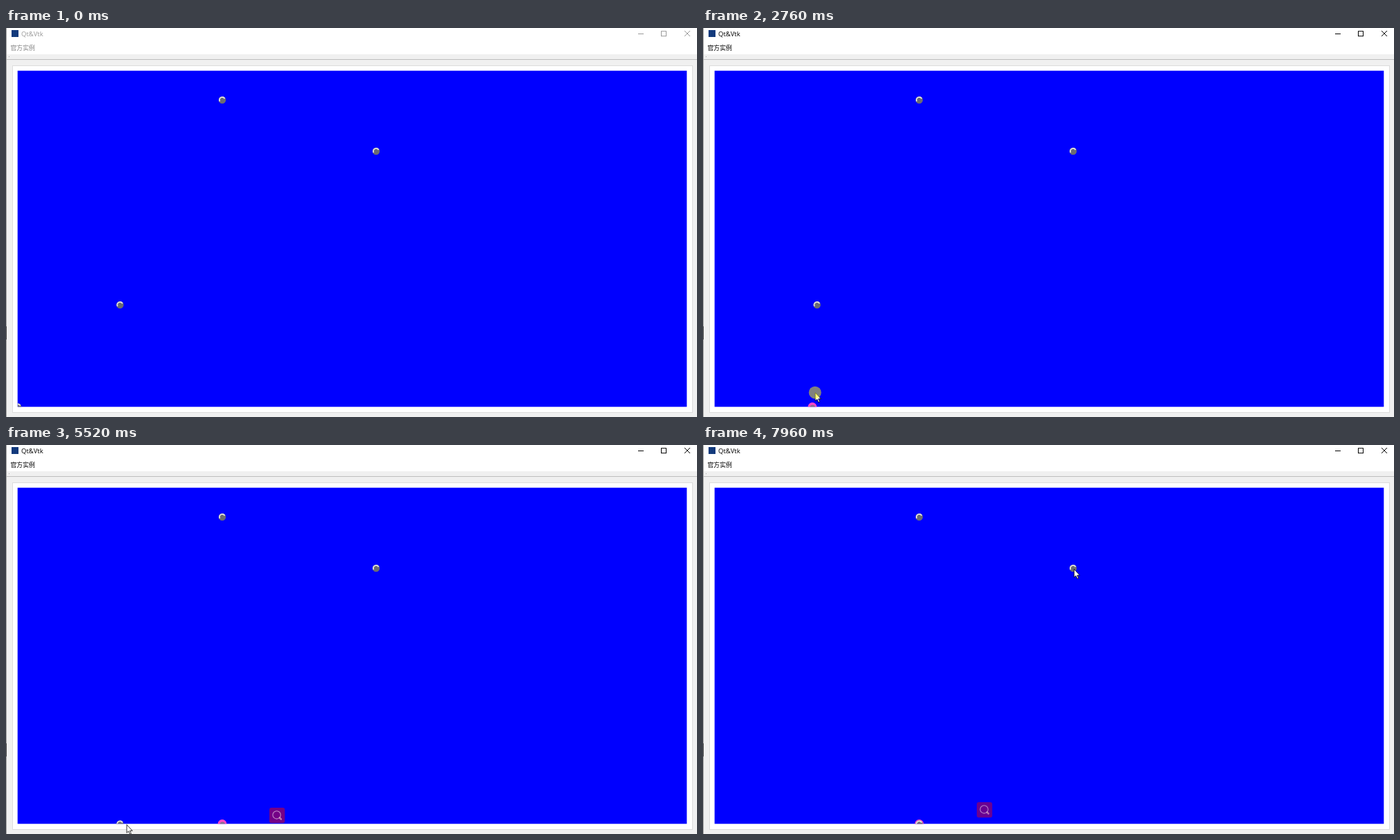
An HTML page with a canvas that plays this animation: 997x562 px, repeating every 8 s.

```html
<!DOCTYPE html>
<html lang="zh">
<head>
<meta charset="utf-8">
<title>Qt&amp;Vtk</title>
<style>
html, body { margin: 0; width: 100%; height: 100%; overflow: hidden; background: #f0f0f0; }
canvas { display: block; width: 997px; height: 562px; }
</style>
</head>
<body>
<canvas id="stage"></canvas>
<script>
const W = 997, H = 562, LOOP = 8000, STEP = 40;
const ENTER = 80, ACTIVE = 2040, LAG = 50, POPUP_DELAY = 280;
const AXIS = 547.5;
const column = n => 17 + 147.5 * n;

const canvas = document.getElementById('stage');
const ctx = canvas.getContext('2d');
const dpr = window.devicePixelRatio || 1;
canvas.width = W * dpr;
canvas.height = H * dpr;

// Pointer moves, each starting where the last one ended; "via" bends the path.
const entry = [893, 552];
const moves = [
  { from: ENTER, to: 840, end: [20, 536], via: [330, 442] },
  { from: 840, to: 1320, end: [19, 544] },
  { from: ACTIVE, to: 2840, end: [166, 525], via: [150, 533] },
  { from: 2840, to: 3520, end: [167, 394], via: [234, 554] },
  { from: 3720, to: 4520, end: [376, 549], via: [290, 545] },
  { from: 4520, to: 4640, end: [368, 550] },
  { from: 4800, to: 5560, end: [163, 548] },
  { from: 5560, to: 6320, end: [320, 546], via: [287, 553] },
  { from: 6680, to: 6880, end: [383, 542] },
  { from: 7200, to: 7960, end: [535, 179], via: [420, 560] }
];

// Each drag drops a ball on a column of the axis.
const homes = [[column(0), AXIS], [column(1), 400]];
const drags = [
  { from: ACTIVE, to: 2840, ball: 0, col: 1 },
  { from: 3760, to: 4520, ball: 1, col: 2 },
  { from: 5560, to: 6720, ball: 0, col: 2 }
];

const clamp = (v, lo, hi) => Math.min(Math.max(v, lo), hi);

function pointerAt(t) {
  let pos = entry;
  for (const { from, to, end, via } of moves) {
    if (t <= from) break;
    const u = Math.min((t - from) / (to - from), 1), v = 1 - u;
    pos = pos.map((a, i) => {
      const mid = via ? via[i] : (a + end[i]) / 2;
      return a * v * v + 2 * u * v * mid + end[i] * u * u;
    });
  }
  return pos;
}

function ballAt(index, t) {
  let [x, y] = homes[index];
  for (const { from, to, ball, col } of drags) {
    if (ball !== index || t < from) continue;
    if (t >= to) {
      [x, y] = [column(col), AXIS];
    } else {
      const [px, py] = pointerAt(t - LAG);
      x = clamp(px, x, column(col));
      y = clamp(py, y, AXIS);
    }
  }
  return [x, y];
}

function box(x, y, w, h, color) {
  ctx.fillStyle = color;
  ctx.fillRect(x, y, w, h);
}

function disc(x, y, r, color) {
  ctx.fillStyle = color;
  ctx.beginPath();
  ctx.arc(x, y, r, 0, 7);
  ctx.fill();
}

function arc(x, y, r, from, to, width, color) {
  ctx.strokeStyle = color;
  ctx.lineWidth = width;
  ctx.beginPath();
  ctx.arc(x, y, r, from, to);
  ctx.stroke();
}

function line(width, color, x0, y0, x1, y1) {
  ctx.strokeStyle = color;
  ctx.lineWidth = width;
  ctx.beginPath();
  ctx.moveTo(x0, y0);
  ctx.lineTo(x1, y1);
  ctx.stroke();
}

function drawWindow(active) {
  box(0, 0, W, H, '#f0f0f0');
  box(0, 0, W, 38, '#fff');
  box(0, 45, W, 1, '#bdbdbd');
  box(4, 41, 1, 1, '#a8a8a8');
  box(9, 54, 982, 502, '#dcdcdc');
  box(10, 55, 980, 500, '#fff');
  box(16.7, 61.7, 965.6, 485.6, '#00f');
  box(0, 0, 1, H, '#a0a0a0');
  box(0, 431, 1, 19, '#444');
  box(8, 3, 10, 10, '#123a7c');

  const ink = active ? '#000' : '#999';
  ctx.fillStyle = ink;
  ctx.font = '9.5px "Open Sans", "Noto Sans", sans-serif';
  ctx.fillText('Qt&Vtk', 22, 12);
  ctx.fillStyle = active ? '#000' : '#858585';
  ctx.font = '8.9px "Noto Sans CJK SC", "Noto Sans CJK", sans-serif';
  ctx.fillText('官方实例', 6.5, 31.7);

  box(912, 8, 8, 1, ink);
  ctx.strokeStyle = ink;
  ctx.lineWidth = 1;
  ctx.strokeRect(945.5, 4.7, 7, 7);
  line(1, ink, 979, 4, 987, 12);
  line(1, ink, 987, 4, 979, 12);
}

function drawBall([x, y], picked) {
  if (picked) {
    disc(x, y, 6.5, '#ff46c8');
    disc(x + 0.3, y + 0.7, 3.8, '#84708c');
    return;
  }
  disc(x, y, 5.2, '#6c6c72');
  arc(x, y, 4.1, 2.6, 5.8, 1.9, '#dedede');
}

function drawScene(t) {
  const last = drags.filter(d => t >= d.from).pop();
  ctx.save();
  ctx.beginPath();
  ctx.rect(17, 62, 965, 485.3);
  ctx.clip();
  drawBall([312, 104]);
  drawBall([534, 178]);
  homes.forEach((_, i) => drawBall(ballAt(i, t), last && last.ball === i));
  ctx.restore();
}

// The search button fades as the pointer moves away from it.
function drawPopup(x, y, distance) {
  ctx.save();
  ctx.globalAlpha = 0.48 + 0.37 * Math.exp(-distance / 140);
  ctx.fillStyle = '#d20028';
  ctx.beginPath();
  ctx.roundRect(x, y, 22.3, 22.3, 3);
  ctx.fill();
  arc(x + 10.6, y + 10.4, 5.7, 0, 7, 1.1, '#fff');
  ctx.lineCap = 'round';
  line(2.4, '#fff', x + 14.9, y + 14.7, x + 16.9, y + 16.7);
  line(0.9, '#d20028', x + 14.9, y + 14.7, x + 16.9, y + 16.7);
  ctx.restore();
}

function drawPopups(t, [x, y]) {
  drags.forEach(({ to }, i) => {
    const shown = to + POPUP_DELAY;
    const hidden = i + 1 < drags.length ? drags[i + 1].from : LOOP;
    if (t < shown || t >= hidden) return;
    const [ax, ay] = pointerAt(shown).map(Math.round);
    const px = ax + 12, py = ay - 26;
    drawPopup(px, py, Math.hypot(px + 11 - x, py + 11 - y));
  });
}

function drawPointer(x, y) {
  ctx.save();
  ctx.translate(x, y);
  ctx.beginPath();
  [[0.4, 0.4], [0.4, 12.2], [3, 9.8], [5, 14.2], [6.8, 13.4], [4.9, 9.2], [8.6, 9.2]]
    .forEach(([px, py]) => ctx.lineTo(px, py));
  ctx.closePath();
  ctx.fillStyle = '#fff';
  ctx.fill();
  ctx.strokeStyle = '#000';
  ctx.lineWidth = 0.8;
  ctx.stroke();
  ctx.restore();
}

function draw(t) {
  ctx.setTransform(dpr, 0, 0, dpr, 0, 0);
  drawWindow(t >= ACTIVE);
  drawScene(t);
  if (t < ENTER) return;

  const pos = pointerAt(t);
  drawPopups(t, pos);
  drawPointer(...pos);
  if (drags.some(d => t >= d.from && t < d.to)) disc(...pos, 9, 'rgba(255,255,0,.5)');
}

const start = performance.now();
function tick() {
  const t = (performance.now() - start) % LOOP;
  draw(Math.floor(t / STEP) * STEP);
  requestAnimationFrame(tick);
}
tick();
</script>
</body>
</html>
```
